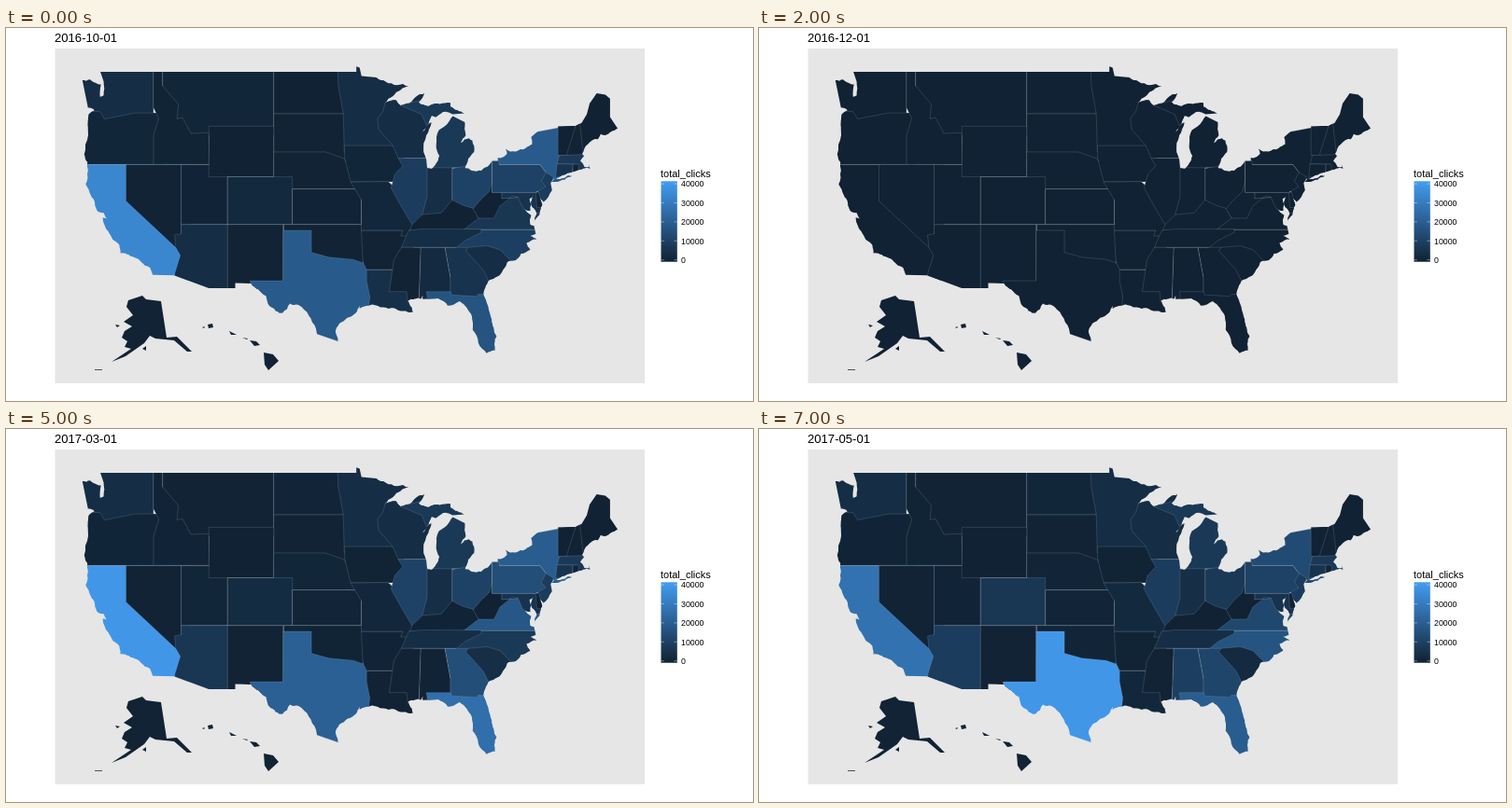
Animation, 800 px wide and 400 px high, one loop 8000 ms. Source, as an HTML page:

```html
<!DOCTYPE html>
<html lang="en">
<meta charset="utf-8">
<title>Clicks by state</title>
<style>
  html, body { margin: 0; height: 100%; overflow: hidden; background: #fff }
  svg { display: block; font: 8.8px "Liberation Sans", Arial, sans-serif }
  #states path { stroke: #a9b9c2; stroke-opacity: .33; stroke-width: .6 }
</style>
<svg width="800" height="400">
  <defs>
    <clipPath id="coast"><path id="land"/></clipPath>
    <linearGradient id="scale" x2="0" y1="1" y2="0">
      <stop id="low"/><stop id="high" offset="1"/>
    </linearGradient>
  </defs>
  <rect x="52.5" y="22" width="631.5" height="359" fill="#e6e6e6"/>
  <text id="date" x="52" y="15" font-size="13.1"></text>
  <g id="states" clip-path="url(#coast)"></g>
  <g id="far"></g>
  <text x="701" y="160" font-size="11">total_clicks</text>
  <rect x="701.5" y="164.3" width="17.3" height="86.4" fill="url(#scale)"/>
  <g id="legend"></g>
</svg>
<script>
const $ = id => document.getElementById(id);
const LOW = [16, 33, 50], HIGH = [67, 156, 241];
const shade = k => `rgb(${LOW.map((c, i) => Math.round(c + (HIGH[i] - c) * k))})`;

let seed = 7;
const random = () => (seed = seed * 16807 % 2147483647) / 2147483647;

function add(parent, tag, attrs, text = '') {
  const el = document.createElementNS('http://www.w3.org/2000/svg', tag);
  for (const key in attrs) el.setAttribute(key, attrs[key]);
  el.textContent = text;
  return $(parent).appendChild(el);
}

// "west north west north ..." to points
function points(text) {
  const n = text.trim().split(/\s+/).map(Number);
  return n.flatMap((w, i) => i % 2 ? [] : [[w, n[i + 1]]]);
}

// Ragged shore: split each edge and push the middle aside
function ragged(a, b, depth) {
  const dx = b[0] - a[0], dy = b[1] - a[1];
  if (!depth || Math.hypot(dx, dy) < .35) return [a];
  const k = (random() - .5) * .22;
  const mid = [(a[0] + b[0]) / 2 - dy * k, (a[1] + b[1]) / 2 + dx * k];
  return [...ragged(a, mid, depth - 1), ...ragged(mid, b, depth - 1)];
}
const shore = text => points(text).flatMap((p, i, all) => all[i + 1] ? ragged(p, all[i + 1], 3) : [p]);

const mercator = lat => Math.asinh(Math.tan(lat * Math.PI / 180));
const project = ([west, north]) => [
  (237.2 + (109.05 - west) * 9.93).toFixed(1),
  (47 + (mercator(49) - mercator(north)) * 569).toFixed(1)
];
const ring = list => 'M' + list.map(project).join('L') + 'Z';

const mainland = [
  shore('124.7 48.4 123.1 48.15 122.7 48.1 122.8 47.2 122.4 47.3 122.4 48.3'),
  points('122.76 49 95.15 49 95.15 49.38 94.8 49.3 94.6 48.7'),
  shore('93 48.6 92 48.3 89.5 48 91.2 47.25 92.1 46.75 90.85 46.95 90.4 46.57 89.2 46.85 87.8 47.47 88.45 46.8 87.4 46.5 86.2 46.67 85 46.75 85 46.48 83.5 45.98'),
  shore('84.75 45.9 85.5 46.1 86.6 45.7 87.05 45.8 88 44.55 87.05 45.28 87.6 44.3 87.9 43 87.5 41.68 87.1 41.65 86.2 42.7 86.53 43.6 86.25 44.7 85.1 45.4 84.75 45.77'),
  shore('83.45 45.3 83.35 44.3 83.9 43.7 83 44.07 82.65 43.9 82.45 43 83.45 41.73 82.7 41.5 81.7 41.5 78.9 42.85 79.07 43.26 76.9 43.28 76.2 43.6 76.3 44.15'),
  points('75 44.97 71.5 45.01 70.85 45.25 70.3 45.9 70 46.7 69.23 47.46 68.3 47.35 67.79 47.07 67.79 45.7'),
  shore('66.97 44.83 68.3 44.3 68.8 44.4 69.1 44 70.2 43.6 70.8 42.85 70.6 42.65 71 42.3 70.55 41.8 70.05 41.78 70.1 42.05 69.95 41.67 71.4 41.5 73.9 40.85 74.2 40.5 74.05 39.9 74.95 38.93 75.5 39.5'),
  shore('75.1 38.7 75.97 37.15 75.7 37.95 76.3 38.7 76 39.5 76.5 39.2 76.4 38.2 77.1 38.35 76.3 37.8 76.4 37 76 36.9'),
  shore('75.8 36.2 76.4 36 75.7 35.7 76.8 35.4 76.4 34.8 77.4 34.45 77.95 33.87 78.9 33.7 79.3 33.05 80.85 32.05 81.45 30.7 80.55 28.4 80.03 26.8 80.2 25.4 81.1 25.13 82.6 27.4 82.7 28.7 84 30.1 85.3 29.7 86.3 30.38'),
  shore('88 30.3 88 30.65 88.15 30.35 89.6 30.2 89.4 29.8 89.05 29.1 90.1 29.2 92.2 29.55 93.85 29.7 94.8 29.4 94.8 29.7 95.2 29 97 28 97.4 27.2 97.15 25.97'),
  shore('98.2 26.06 99.1 26.4 99.5 27.5 101.4 29.77 102.3 29.88 103.1 29 104.5 29.65 104.9 30.6 106.5 31.75'),
  points('108.21 31.78 108.21 31.33 111.07 31.33 114.8 32.5 117.12 32.53'),
  shore('117.4 33.2 118.4 33.75 119.2 34.15 120.6 34.5 120.7 35.2 121.9 36.4 122.5 37.6 122.1 37.5 122.4 38 123 38.1 123.8 39.5 124.35 40.4 124.1 41.5 124.5 42.8 124 45.9 123.4 46.2 124.1 46.4')
].flat();
const island = shore('74.03 40.6 73.75 40.85 72.3 41.13 71.9 41.07 73.5 40.58');
$('land').setAttribute('d', ring(mainland) + ring(island));

const shapes = [];
// Thousands of clicks for Oct, Nov, Jan, Mar, May, or one steady level; Feb and Apr lie halfway
function track(el, clicks) {
  const level = clicks ? clicks.split(' ').map(Number) : Array.from('quiet', () => .3 + random() * 1.6);
  const [oct, nov = oct, jan = oct, mar = oct, may = oct] = level;
  shapes.push([el, [oct, nov, .3, jan, (jan + mar) / 2, mar, (mar + may) / 2, may]]);
}
// Two points stand for a box
function state(id, border, clicks) {
  let p = points(border);
  if (p.length === 2) p = [p[0], [p[1][0], p[0][1]], p[1], [p[0][0], p[1][1]]];
  track(add('states', 'path', { id, d: ring(p) }), clicks);
}
const far = (id, d) => track(add('far', 'path', { id, d }), '.5');

// Later states cover the loose edges of earlier ones; the coast is clipped
state('WA', '125 49.1 117.04 45', '4');
state('MT', '116.05 49.1 104.05 44.3');
state('ND', '104.05 49.1 96 45.94');
state('SD', '104.05 45.94 96 42.4', '.5');
state('OR', '126 46.2 122.8 46.1 122.3 45.55 119 46 116 46 116 42 126 42');
state('ID', '117.04 50 116.05 50 116.05 48 114.35 46.65 114.5 45.56 113.9 45.65 113 44.45 111.05 44.5 111 42 117.03 42 117.03 44.3 116.46 45.6 117.04 46.4');
state('CA', '126 42 113 32', '34 26 34 39 27');
state('NV', '120 42 114.04 42 114.04 34.55 120 39', '.7');
state('UT', '114.04 42 109.05 37');
state('AZ', '114.04 37 109 37 109 31 115 31 114.72 32.7 114.14 34.3 114.63 35 114.75 36.1 114.04 36.2', '4 2 8 7 9');
state('WY', '111.05 45 104.05 41', '.4');
state('NE', '104.05 43 98.5 43 96.4 42.45 95 40 104.05 40');
state('CO', '109.05 41 102.05 37', '2.5 8 6 3.5 7');
state('KS', '102.05 40 94.62 37');
state('NM', '109.05 37 103.04 31', '.6');
state('OK', '103 37 94.43 33');
state('TX', '103.04 36.5 100 36.5 100 34.56 98.1 34.13 95.5 33.93 94.04 33.5 93 25 106 29 106.62 32 103.06 32', '19 19 28 21 39');
state('MN', '97.23 50 97.1 48 96.56 45.94 96.45 43 91 43 89 48 89 50', '4');
state('IA', '96.45 43.5 90 43.5 90 40.6 95.77 40.6 96.4 42.45');
state('AR', '94.62 36.5 89 36.5 89 33.01 94.04 33.01 94.45 33.7');
state('MO', '95.77 40.58 91.73 40.61 91.4 40.4 89 38 89 36 90.37 36 90.15 36.5 94.62 36.5 94.62 39.1', '2 2 10 2 2.5');
state('LA', '94.04 33.01 90 33.01 88 28 94 28 93.7 30.5 94.04 32', '5 1 5 .5 2');
state('WI', '92.02 46.8 92.3 46.1 92.87 45.6 92.75 44.75 91.22 43.5 90.64 42.5 87 42.5 86 48', '4');
state('IL', '90.64 42.5 87 42.5 87 37 89.15 37 90.2 38.4 91.42 40.1 91 41.2 90.15 41.9', '9 6 13 11 9');
state('IN', '87.53 42 84.81 42 84.81 37.5 88.05 37.85 87.53 39.35', '4.5');
state('MI', '90.42 46.57 88.1 45.9 87.6 45.05 86.7 45.5 87 41.76 83.4 41.73 82 42 82 48', '8');
state('VA', '83.68 39.7 75 36.55', '7 9 9 18 13');
state('NC', '84.4 36.56 75 33', '10 9 12 8 17');
state('OH', '84.81 41.7 82 42 80.52 42.3 80.52 38.3 84.81 38.3', '11 8 10 11 8');
state('MD', '79.48 39.72 75 39.72 75 38 76.3 38 77.2 38.4 77.72 39.32 79.48 39.2', '6');
state('WV', '80.52 40.64 80.52 39.72 79.48 39.72 79.48 39.2 77.72 39.32 78.35 39.4 79.65 38.6 80.3 37.55 81.97 37.54 82.6 38.3 81.75 39.1 80.8 39.8', '.3');
state('KY', '89.4 36.5 89.15 37 88.05 37.85 86 38 84.82 39.1 83.7 38.65 82.6 38.4 81.97 37.54 83.68 36.5');
state('TN', '90.3 35 89.5 36.5 88.05 36.62 81.68 36.6 81.7 36.3 83.5 35.57 84.32 35', '4.3');
state('MS', '90.3 35 88.2 35 88.4 30 89.6 30 89.73 31 91.6 31 91.1 33.9', '.6');
state('AL', '88.2 35 85.6 35 85 32.3 85 30 88.4 30', '3 1 2.5 1 10');
state('GA', '85.6 35 83 35 80 33 80 30 85 30.5 85 32.3', '6 10 14 15 12');
state('SC', '83.1 35 81.05 35.15 79.67 34.8 78.55 33.86 79 32 80.9 32 81.5 33 83.35 34.7', '4 .3 .3 4.5 3');
state('FL', '87.6 31 85 31 84.86 30.7 82.2 30.57 82 30.75 79.5 30.75 79.5 24 88 24 87.5 30.5', '17 16 14 26 20');
state('NJ', '75.6 41.4 73.5 38.8', '9');
state('NY', '79.9 42 75.35 42 74.7 41.36 73.9 41 74.1 40.5 71 40.5 71 45.2 79.9 44', '19 10 15 20 14');
state('PA', '80.52 42.3 79.76 42.3 79.76 42 75.35 42 74.7 41.36 75.2 40.65 74.73 40.2 75.79 39.72 80.52 39.72', '11 6.5 11 15 11');
state('DE', '75.79 39.72 75.5 39.75 75 38.45 75.7 38.46');
state('ME', '71.6 48 66 43', '.4');
state('VT', '73.4 45.1 71.5 42.73', '.3');
state('NH', '71.5 45.02 72.5 42.73 70.6 42.73 70.7 43.07 71.08 45.4', '.6');
state('MA', '73.5 42.05 73.25 42.73 70.5 42.8 69 42 70 41 71.1 41.3 71.38 42.02', '8');
state('CT', '73.5 42.05 71.8 42.02 71.86 41.2 73.65 40.95', '6');
state('RI', '71.8 42.02 71.2 41.3', '.5');
far('AK', `M131 292L146 287 150 291 166 293 172 332 183 331 199 347 194 347 180 335 160 333 154 330
  148 338 128 352 113 358 134 344 127 342 130 336 124 332 127 325 135 320 126 315 136 308 129 299z
  M117 318l5 1-3 2zM146 344l4-3 0 5zM95 366h8v.7h-8z`);
far('HI', `M276 348L286 350 292 357 281 367 277 361z M216 318l5-1 1 4-5 1zM210 321l3-1-1 2z
  M239 325l8 4-6 0zM253 332l6 1-1 1zM261 335l7 1 4 4-6 1z`);

$('low').style.stopColor = shade(0);
$('high').style.stopColor = shade(1);
for (let i = 0; i < 5; i++) {
  const y = 248.7 - i * 20.4;
  add('legend', 'path', { d: `M701.5 ${y}h3.4M715.4 ${y}h3.4`, stroke: '#fff', 'stroke-width': .4 });
  add('legend', 'text', { x: 723, y: y + 3.2 }, i * 10000);
}

function frame() {
  const step = Math.floor(performance.now() / 1000) % 8;
  $('date').textContent = new Date(Date.UTC(2016, 9 + step)).toISOString().slice(0, 10);
  for (const [el, clicks] of shapes) el.setAttribute('fill', shade(clicks[step] / 41));
  requestAnimationFrame(frame);
}
frame();
</script>
</html>
```
